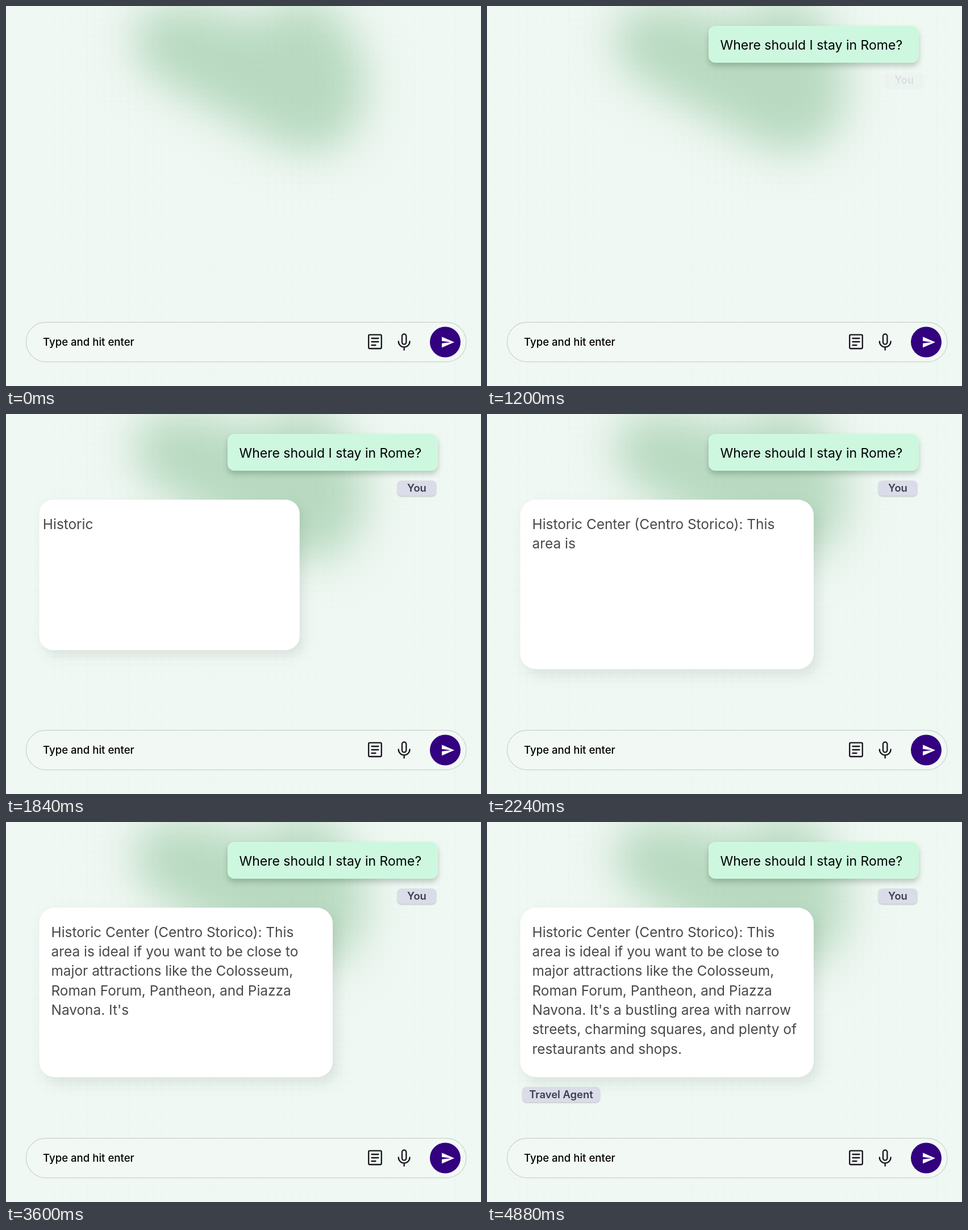
Animation, 836 px wide and 670 px high, one loop 6.04 s. Source, as an HTML page:

```html
<!DOCTYPE html>
<html lang="en">
<head>
<meta charset="utf-8">
<title>Chat about Rome</title>
<style>
  html, body { margin: 0; width: 100%; height: 100%; overflow: hidden; background: #f0f8f3; }
  svg { display: block; width: 836px; height: 670px; }
  text { font-family: Inter, "Open Sans", sans-serif; font-optical-sizing: none; white-space: pre; }
  .small { font-size: 18.6px; font-weight: 500; }
  .ask { font-size: 23px; }
  .reply { font-size: 24.4px; fill: #484848; }
  .tag rect { fill: #dadde9; filter: drop-shadow(0 1px 1px rgba(60, 70, 80, .35)); }
  .tag text { font-size: 18.4px; font-weight: 600; fill: #3d3d4d; text-anchor: middle; }
  .icon { fill: none; stroke: #16161a; stroke-width: 2.3; stroke-linecap: round; stroke-linejoin: round; }
  #question { fill: #cdf8df; filter: drop-shadow(0 6px 5px rgba(30, 60, 40, .24)); }
  #answer { fill: #fff; filter: drop-shadow(8px 11px 11px rgba(30, 50, 40, .1)); }
</style>
</head>
<body>
<svg viewBox="0 0 836 670">
  <defs>
    <filter id="soft" filterUnits="userSpaceOnUse" x="0" y="-200" width="836" height="700" color-interpolation-filters="sRGB">
      <feGaussianBlur stdDeviation="37"/>
    </filter>
    <pattern id="grid" width="14.4" height="14.4" patternUnits="userSpaceOnUse">
      <path d="M0 10H14.4M14 0V14.4" stroke="#2c6b4a" stroke-opacity=".025" fill="none"/>
    </pattern>
  </defs>

  <rect width="836" height="670" fill="#f0f8f3"/>
  <path filter="url(#soft)" fill="#b9dac1" d="M225 50C225-20 340-5 400 15C470 40 480-30 550-10C620 30 650 130 625 190C600 265 530 270 480 245L280 140C235 110 225 90 225 50Z"/>
  <rect width="836" height="670" fill="url(#grid)"/>

  <rect x="35.5" y="557.7" width="774.5" height="69.6" rx="34.8" fill="#f2f9f5" stroke="#cbd1cd" stroke-width="1.2"/>
  <text class="small" x="65" y="599">Type and hit enter</text>
  <g class="icon">
    <rect x="638.2" y="579.6" width="22.6" height="24.4" rx="2"/>
    <path d="M643.5 586H655.5M643.5 592H655.5M643.5 598H650.5"/>
    <rect x="697" y="578.4" width="7.4" height="18" rx="3.7"/>
    <path d="M690.8 591.5a9.9 9.9 0 0 0 19.8 0M700.7 601.6V606.5"/>
  </g>
  <g id="send">
    <circle cx="773" cy="592.5" r="27" fill="#330080"/>
    <path fill="#fff" transform="translate(765 580.2) scale(1.045)" d="M2 21 23 12 2 3V10L17 12 2 14Z"/>
  </g>

  <rect id="question" x="390" y="35" width="370" height="65" rx="12"/>
  <g id="ask"></g>
  <g id="youTag" class="tag">
    <rect x="689" y="117.5" width="68" height="27" rx="7"/><text x="723" y="137.3">You</text>
  </g>

  <rect id="answer" x="58.5" y="151" width="516.5" height="299" rx="28"/>
  <g id="reply"></g>
  <g id="agentTag" class="tag">
    <rect x="62.5" y="467" width="136" height="27" rx="7"/><text x="130.5" y="487">Travel Agent</text>
  </g>
</svg>

<script>
const LOOP = 6040, WORD_MS = 70;
const byId = id => document.getElementById(id);
const progress = (t, start, duration) => Math.min(1, Math.max(0, (t - start) / duration));
const easeOut = p => 1 - (1 - p) ** 3;

function makeLines(id, x, y, lineHeight, lines) {
  return lines.map((line, i) => {
    const node = document.createElementNS("http://www.w3.org/2000/svg", "text");
    node.setAttribute("class", id);
    node.setAttribute("x", x);
    node.setAttribute("y", y + i * lineHeight);
    byId(id).append(node);
    return { node, words: line.split(" ") };
  });
}

const ask = makeLines("ask", 410.5, 77.2, 0, ["Where should I stay in Rome?"]);
const reply = makeLines("reply", 79.5, 202.7, 34.35, [
  "Historic Center (Centro Storico): This",
  "area is ideal if you want to be close to",
  "major attractions like the Colosseum,",
  "Roman Forum, Pantheon, and Piazza",
  "Navona. It's a bustling area with narrow",
  "streets, charming squares, and plenty of",
  "restaurants and shops."
]);

function revealWords(lines, t, start) {
  let count = t < start ? 0 : Math.floor((t - start) / WORD_MS) + 1;
  for (const { node, words } of lines) {
    const shown = words.slice(0, Math.max(0, count)).join(" ");
    if (node.textContent !== shown) node.textContent = shown;
    count -= words.length;
  }
}

function scaleAt(id, x, y, s) {
  byId(id).setAttribute("transform", `translate(${x} ${y}) scale(${s}) translate(${-x} ${-y})`);
}

function grow(id, x, y, s) {
  byId(id).style.visibility = s > 0 ? "visible" : "hidden";
  scaleAt(id, x, y, s);
}

function slideTag(id, p, distance) {
  byId(id).style.opacity = p;
  byId(id).setAttribute("transform", `translate(${distance * (1 - easeOut(p))} 0)`);
}

function draw(t) {
  const press = Math.sin(Math.PI * progress(t, 240, 840)) ** 2;
  scaleAt("send", 773, 592.5, 1 - 0.1 * press);

  grow("question", 760, 35, easeOut(progress(t, 0, 600)));
  revealWords(ask, t, 660);
  slideTag("youTag", progress(t, 1150, 400), 17);

  const size = easeOut(progress(t, 1535, 592));
  grow("answer", 58.5, 151, size);
  byId("reply").setAttribute("transform", `translate(${-130 * (1 - size)} 0)`);
  revealWords(reply, t, 1780);
  slideTag("agentTag", progress(t, 4580, 300), -12);
}

const begin = performance.now();
function tick() {
  draw((performance.now() - begin) % LOOP);
  requestAnimationFrame(tick);
}
draw(0);
requestAnimationFrame(tick);
</script>
</body>
</html>
```
